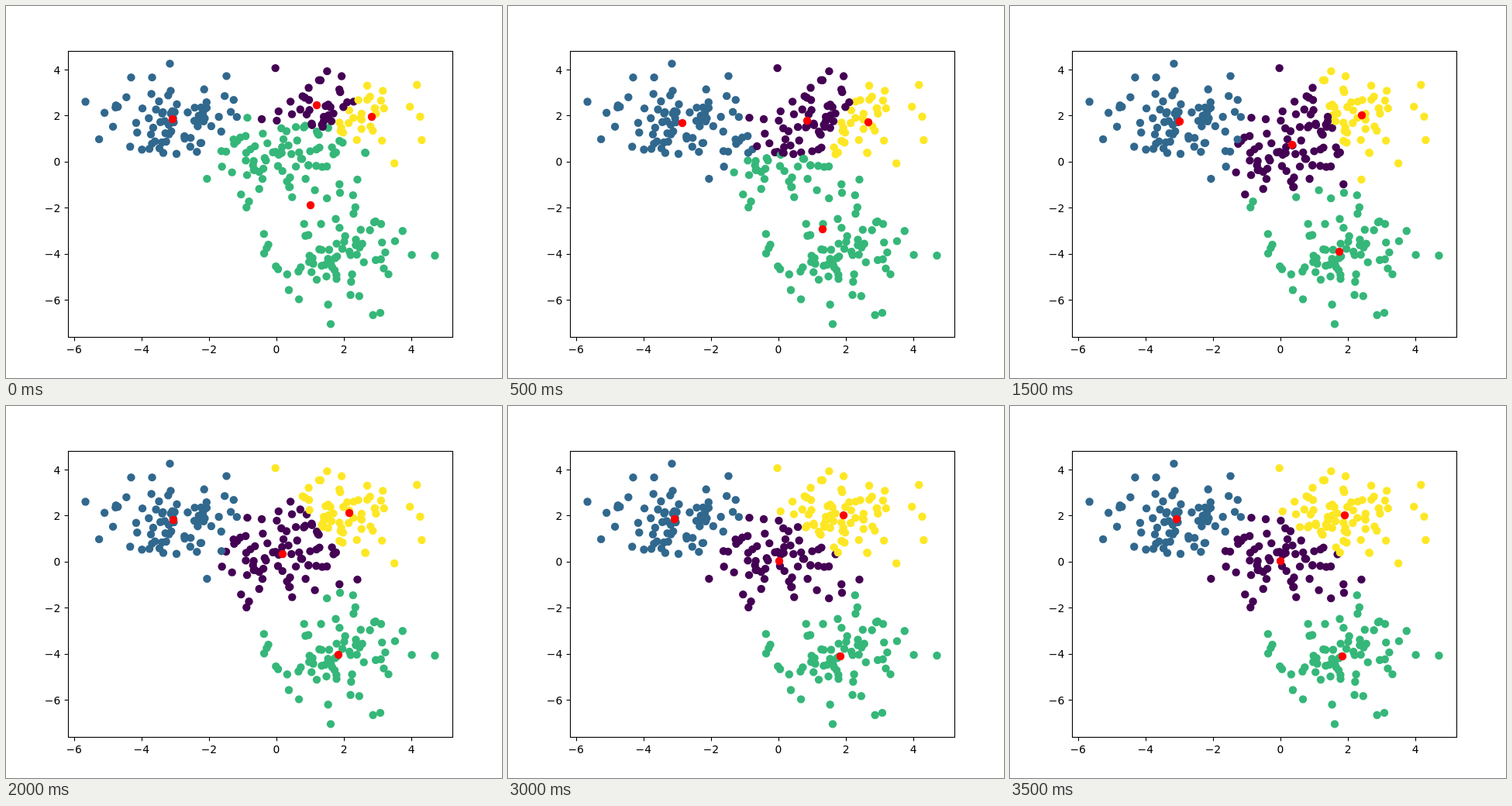
An HTML page with a canvas that plays this animation: 640 px wide and 480 px high, repeating every 4.5 s.

```html
<!DOCTYPE html>
<html lang="en">
<head>
<meta charset="utf-8">
<title>k-means clustering</title>
<style>
html, body { margin: 0; width: 100%; height: 100%; overflow: hidden; background: #fff; }
canvas { display: block; }
</style>
</head>
<body>
<canvas id="plot" width="640" height="480"></canvas>
<script>
const ctx = document.getElementById("plot").getContext("2d");
const COLORS = ["#440154", "#31688e", "#35b779", "#fde725"];
const BLOBS = [[0, 0], [2, 2], [-3, 2], [2, -4]];
const SEEDS = [[1.60055, 2.37006], [-3.45, 2.98], [1.2744, 0.61664], [2.49374, 1.8839]];
const STEP = 500, STATES = 8, LOOP = 4500;
const BOX = { left: 80, right: 576, top: 57.6, bottom: 427.2 };

// Mersenne Twister, seed 0
const mt = new Uint32Array(624);
for (let i = 1; i < 624; i++) {
  mt[i] = Math.imul(1812433253, mt[i - 1] ^ (mt[i - 1] >>> 30)) + i;
}
let pos = 0;

function nextInt() {
  let y = (mt[pos] & 0x80000000) | (mt[(pos + 1) % 624] & 0x7fffffff);
  mt[pos] = mt[(pos + 397) % 624] ^ (y >>> 1) ^ (y & 1 ? 0x9908b0df : 0);
  y = mt[pos];
  pos = (pos + 1) % 624;
  y ^= y >>> 11;
  y ^= (y << 7) & 0x9d2c5680;
  y ^= (y << 15) & 0xefc60000;
  return (y ^ (y >>> 18)) >>> 0;
}

function nextFloat() {
  const hi = nextInt() >>> 5, lo = nextInt() >>> 6;
  return (hi * 67108864 + lo) / 9007199254740992;
}

function gaussPair() {
  let a, b, r;
  do {
    a = 2 * nextFloat() - 1;
    b = 2 * nextFloat() - 1;
    r = a * a + b * b;
  } while (r >= 1 || r === 0);
  const f = Math.sqrt(-2 * Math.log(r) / r);
  return [f * b, f * a];
}

function shuffle(list) {
  for (let i = list.length - 1; i > 0; i--) {
    const mask = 2 ** (32 - Math.clz32(i)) - 1;
    let j;
    do j = nextInt() & mask; while (j > i);
    [list[i], list[j]] = [list[j], list[i]];
  }
}

const points = [];
for (const [cx, cy] of BLOBS) {
  for (let i = 0; i < 75; i++) {
    const [dx, dy] = gaussPair();
    points.push([cx + dx, cy + dy]);
  }
}
shuffle(points);

// k-means: label by nearest centre, then move each centre to its mean
function nearest([x, y], centres) {
  const dist = centres.map(([cx, cy]) => (x - cx) ** 2 + (y - cy) ** 2);
  return dist.indexOf(Math.min(...dist));
}

function mean(list) {
  return [0, 1].map(axis => list.reduce((sum, p) => sum + p[axis], 0) / list.length);
}

const states = [];
let centres = SEEDS;
for (let s = 0; s < STATES; s++) {
  const labels = points.map(p => nearest(p, centres));
  centres = centres.map((_, k) => mean(points.filter((_, i) => labels[i] === k)));
  states.push({ labels, centres });
}

// Linear scale with a 5% margin on both ends
function scale(axis, from, to) {
  const values = points.map(p => p[axis]);
  const min = Math.min(...values), range = Math.max(...values) - min;
  return v => from + (to - from) * ((v - min) / range + 0.05) / 1.1;
}
const toX = scale(0, BOX.left, BOX.right);
const toY = scale(1, BOX.bottom, BOX.top);

function dot(x, y, color) {
  ctx.fillStyle = color;
  ctx.beginPath();
  ctx.arc(x, y, 5.2, 0, 2 * Math.PI);
  ctx.fill();
}

function line(x1, y1, x2, y2) {
  ctx.beginPath();
  ctx.moveTo(x1, y1);
  ctx.lineTo(x2, y2);
  ctx.stroke();
}

function drawAxes() {
  ctx.strokeStyle = ctx.fillStyle = "#000";
  ctx.lineWidth = 1.11;
  ctx.font = "13.89px 'DejaVu Sans', sans-serif";
  ctx.strokeRect(80.5, 58.5, 496, 369);
  for (let v = -6; v <= 4; v += 2) {
    const label = String(v).replace("-", "\u2212");
    const x = Math.round(toX(v)) + 0.5, y = Math.round(toY(v)) + 0.5;
    line(x, 427.5, x, 432.4);
    line(80.5, y, 75.6, y);
    ctx.textAlign = "center";
    ctx.fillText(label, toX(v), 448);
    ctx.textAlign = "right";
    ctx.fillText(label, 70.3, Math.round(toY(v) + 5.5));
  }
}

function draw({ labels, centres }) {
  ctx.fillStyle = "#fff";
  ctx.fillRect(0, 0, 640, 480);
  points.forEach(([x, y], i) => dot(toX(x), toY(y), COLORS[labels[i]]));
  centres.forEach(([x, y]) => dot(Math.round(toX(x)), Math.round(toY(y)), "#f00"));
  drawAxes();
}

const start = performance.now();
function tick() {
  const t = (performance.now() - start) % LOOP;
  draw(states[Math.min(STATES - 1, Math.floor(t / STEP))]);
  requestAnimationFrame(tick);
}
tick();
</script>
</body>
</html>
```
